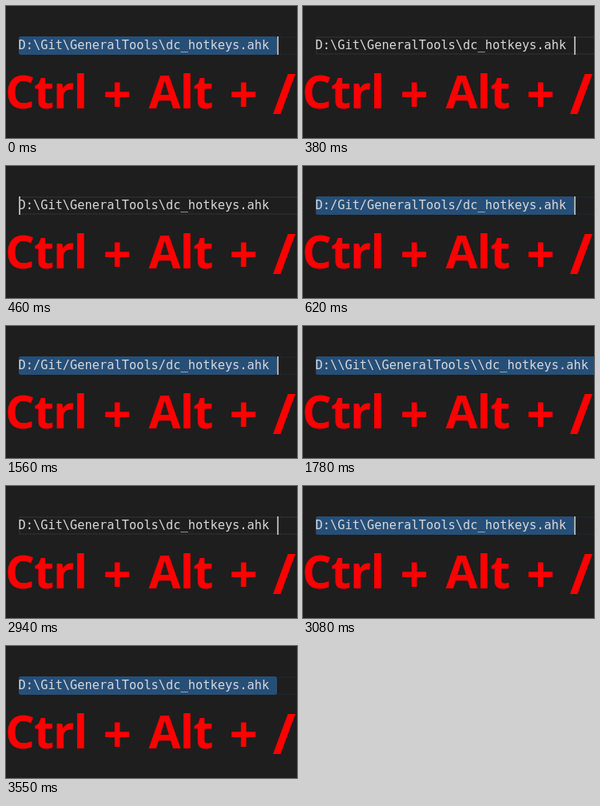
An HTML page that plays this animation: 364x165 px, repeating every 3700 ms.

```html
<!DOCTYPE html>
<html lang="en">
<head>
<meta charset="utf-8">
<style>
  html, body { margin: 0; width: 100%; height: 100%; overflow: hidden; background: #1e1e1e; }
  svg { display: block; }
  #path { font: 15.34px "DejaVu Sans Mono", monospace; fill: #d8d8d8; white-space: pre; }
  #keys { font: bold 58px "Noto Sans", "Open Sans", sans-serif; fill: #f00; letter-spacing: -1px; }
  .plus { font-size: 62px; font-weight: 600; }
  .slash { font-size: 70px; font-weight: 600; }
</style>
</head>
<body>
<svg width="364" height="165" viewBox="0 0 364 165">
  <rect id="line" x="17" y="39" width="360" height="21" fill="none" stroke-width="2"/>
  <rect id="selection" x="16" y="38" height="23" rx="3" fill="#264f78"/>
  <text id="path" x="15.5" y="54"></text>
  <rect id="caret" y="38" width="2" height="23" fill="#aeafad"/>
  <g id="keys">
    <text x="-1" y="128">Ctrl</text>
    <text class="plus" x="121.5" y="132.6">+</text>
    <text x="178.5" y="128">Alt</text>
    <text class="plus" x="279.5" y="132.6">+</text>
    <text class="slash" x="333.5" y="135">/</text>
  </g>
</svg>
<script>
const LOOP = 3700, LEFT = 16, CHAR = 9.23;
const single = 'D:\\Git\\GeneralTools\\dc_hotkeys.ahk ';
const forward = single.replaceAll('\\', '/');
const doubled = single.replaceAll('\\', '\\\\');

// start time, text, selected, caret: 'end', 'start' or '' when blinked off
const states = [
  [0, single, true, 'end'],
  [70, single, true, ''],
  [220, single, true, 'end'],
  [380, single, false, 'end'],
  [460, single, false, 'start'],
  [550, forward, false, 'end'],
  [620, forward, true, 'end'],
  [1080, forward, true, ''],
  [1560, forward, true, 'end'],
  [1630, doubled, false, 'end'],
  [1780, doubled, true, 'end'],
  [2940, single, false, 'end'],
  [3080, single, true, 'end'],
  [3470, single, true, '']
];

const [line, selection, path, caret] =
  ['line', 'selection', 'path', 'caret'].map(id => document.getElementById(id));
let shown;

function draw() {
  const time = performance.now() % LOOP;
  const state = states.findLast(s => s[0] <= time);
  if (state !== shown) {
    const [, text, selected, side] = state;
    const width = text.length * CHAR;
    path.textContent = text;
    line.setAttribute('stroke', selected ? '#1f232a' : '#292929');
    selection.setAttribute('width', selected ? width : 0);
    caret.setAttribute('x', side === 'start' ? LEFT : LEFT + width);
    caret.setAttribute('visibility', side ? 'visible' : 'hidden');
    shown = state;
  }
  requestAnimationFrame(draw);
}
draw();
</script>
</body>
</html>
```
